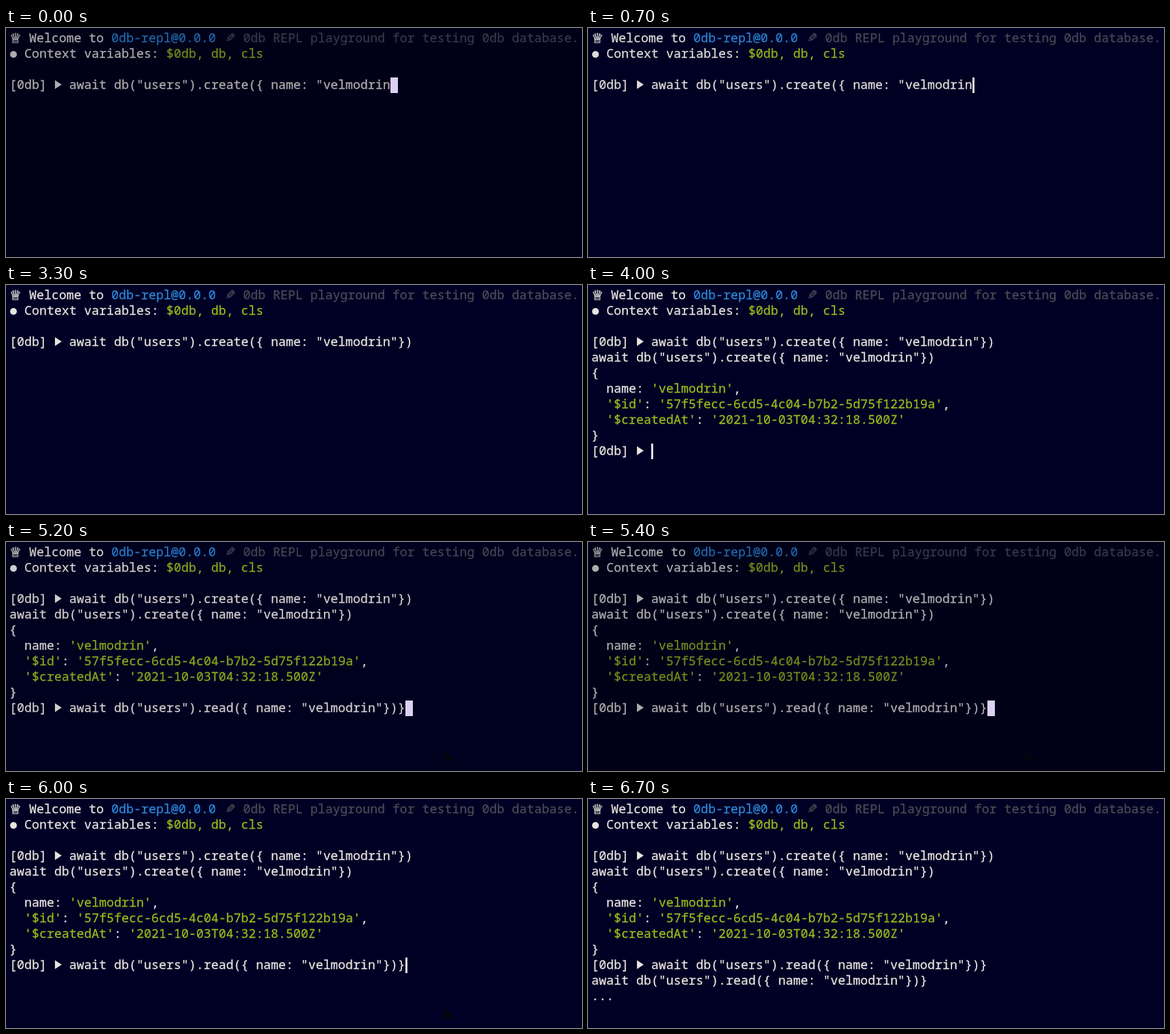
Write an HTML page that moves like this. It is 848 px wide and 338 px high and loops after 7.2 s.

```html
<!DOCTYPE html>
<html lang="en">
<head>
<meta charset="utf-8">
<title>REPL session</title>
<style>
html, body { margin: 0; width: 100%; height: 100%; overflow: hidden; background: #000024; }
#screen {
  position: absolute; left: 5px; top: 2px; margin: 0;
  font: 500 18.3333px/23px "Noto Sans Mono", "DejaVu Sans", monospace;
  font-variant-ligatures: none; white-space: pre; color: #e8e4df;
  -webkit-text-stroke: .3px currentColor;
}
#screen div { height: 23px; }
#screen i { display: inline-block; font-style: normal; }
.icon { width: 18px; }
.crown { width: 18px; height: 23px; font-size: 20px; position: relative; top: 1px; }
.pencil { transform: scaleX(-1); }
.dot { width: 10px; height: 10px; margin: 0 .5px; border-radius: 50%; background: currentColor; }
.arrow { width: 11px; height: 13px; background: currentColor; clip-path: polygon(10% 0, 100% 50%, 10% 100%); }
.blue { color: #2c88da; }
.green { color: #98b91c; }
.dim { color: #4d4a56; }
#cursor { position: absolute; height: 23px; }
#mouse {
  position: absolute; left: 646px; top: 309px; width: 12px; height: 19px; background: #04040a;
  clip-path: polygon(0 0, 100% 62%, 62% 64%, 84% 94%, 64% 100%, 42% 70%, 0 88%);
}
</style>
</head>
<body>
<div id="screen"></div>
<div id="cursor"></div>
<div id="mouse"></div>
<script>
const LOOP = 7200, COL = 11, ROW = 23, LEFT = 5, TOP = 4;
const [screenEl, cursorEl, mouseEl] = ['screen', 'cursor', 'mouse'].map(id => document.getElementById(id));

const tint = (name, text) => `<span class="${name}">${text}</span>`;
const green = text => tint('green', text);
const prompt = '[0db] <i class="arrow"></i> ';
const user = 'velmodrin';
const create = `await db("users").create({ name: "${user}`;
const read = `await db("users").read({ name: "${user}"})}`;

const header = [
  '<i class="crown">♕</i> Welcome to ' + tint('blue', '0db-repl@0.0.0') +
    tint('dim', ' <i class="icon pencil">✎</i> 0db REPL playground for testing 0db database.'),
  '<i class="dot"></i> Context variables: ' + green('$0db, db, cls'),
  ''
];
const typed = end => [...header, prompt + create + end];
const result = [
  ...typed('"})'),
  create + '"})',
  '{',
  `  name: ${green(`'${user}'`)},`,
  `  ${green("'$id'")}: ${green("'57f5fecc-6cd5-4c04-b7b2-5d75f122b19a'")},`,
  `  ${green("'$createdAt'")}: ${green("'2021-10-03T04:32:18.500Z'")}`,
  '}'
];

// start time, lines, cursor column
const states = [
  [0, typed(''), 51],
  [2000, typed('"'), 52],
  [2700, typed('"}'), 53],
  [2800, typed('"})'), 54],
  [3500, [...result, prompt], 8],
  [5200, [...result, prompt + read], 53],
  [6200, [...result, prompt + read, read, '... '], 4]
];
// start time, brightness (0 = window out of focus, 1 = in focus)
const levels = [
  [0, 0], [500, .3], [600, .6], [700, .85], [800, 1],
  [5200, .6], [5300, .3], [5400, 0], [5600, .4], [5700, .85], [6000, 1]
];
// the blink restarts at these times
const blinks = [[0], [600], [2000], [2700], [2800], [3600], [4600], [5200], [5700], [6200]];

const at = (list, t) => list.findLast(item => item[0] <= t);
let shown;

function draw(now) {
  const t = now % LOOP;
  const state = at(states, t);
  const [, lines, col] = state;
  if (state !== shown) {
    screenEl.innerHTML = lines.map(line => `<div>${line}</div>`).join('');
    shown = state;
  }

  const level = at(levels, t)[1];
  screenEl.style.opacity = .75 + .25 * level;
  document.body.style.background = `rgb(0, 0, ${Math.round(23 + 13 * level)})`;
  mouseEl.hidden = t < 5200 || t >= 6200;

  const block = t < 600 || (t >= 5200 && t < 5700);
  const lit = Math.floor((t - at(blinks, t)[0]) / 500) % 2 === 0;
  Object.assign(cursorEl.style, {
    left: LEFT + col * COL + 'px',
    top: TOP + (lines.length - 1) * ROW + 'px',
    width: block ? '11px' : '3px',
    background: block ? '#ddd0f5' : '#e4dcf0',
    visibility: block || lit ? 'visible' : 'hidden'
  });
  requestAnimationFrame(draw);
}
draw(0);
</script>
</body>
</html>
```
